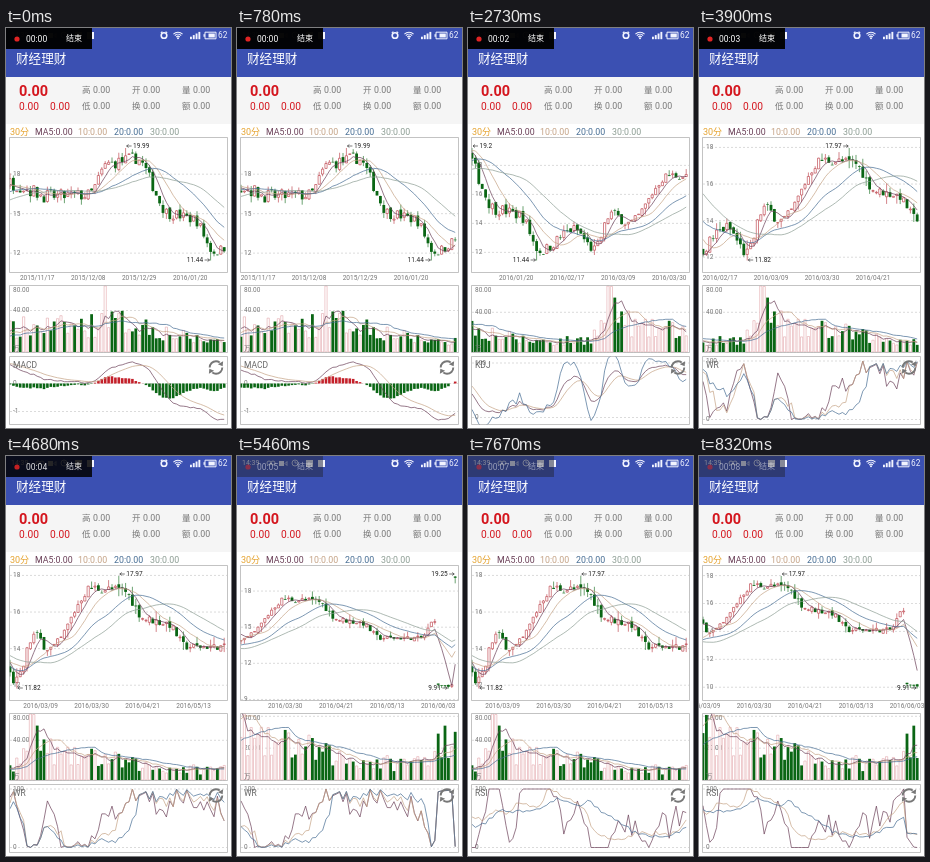
These frames come from a looping animation (225x400 px, 8450 ms). An HTML page with a canvas:

```html
<!DOCTYPE html>
<html lang="zh">
<head>
<meta charset="utf-8">
<style>
  html, body { margin: 0; width: 100%; height: 100%; overflow: hidden; background: #fff; }
  canvas { display: block; width: 225px; height: 400px; }
</style>
</head>
<body>
<canvas id="stage"></canvas>
<script>
const LOOP = 8450, PAD = 40, VISIBLE = 64, TOTAL = PAD + 149, PITCH = 3.4, LEFT = 4;
const RED = '#b8323c', PINK = '#e3a7ac', GREEN = '#0a6614', GRAY = '#777', HOT = '#d4161e';
const LINES = ['#6b4058', '#c4a285', '#456c93', '#8b9c92'];
const FONT = 'Roboto, "Noto Sans CJK SC", "Noto Sans CJK", sans-serif';
const DATES = ('2015/11/17 2015/12/08 2015/12/29 2016/01/20 2016/02/17 ' +
  '2016/03/09 2016/03/30 2016/04/21 2016/05/13 2016/06/03').split(' ');

const canvas = document.getElementById('stage');
const ctx = canvas.getContext('2d');
const dpr = window.devicePixelRatio || 1;
canvas.width = 225 * dpr;
canvas.height = 400 * dpr;

// Interpolates between [x, y] key points
const linear = f => f, eased = f => f * f * (3 - 2 * f);
function between(keys, x, ease) {
  const k = keys.findIndex(key => key[0] >= x);
  if (k < 0) return keys[keys.length - 1][1];
  if (k === 0) return keys[0][1];
  const [x0, y0] = keys[k - 1], [x1, y1] = keys[k];
  return y0 + ease((x - x0) / (x1 - x0)) * (y1 - y0);
}

let seed = 7;
const random = () => (seed = seed * 16807 % 2147483647) / 2147483647;
const hump = (n, center, width) => Math.exp(-(((n - center) / width) ** 2));

// Candle number and price at the turning points
const TURNS = [[-40, 13.5], [0, 17.3], [12, 16.3], [23, 16.4], [29, 18.8], [37, 19.2], [47, 15], [54, 14.6],
  [60, 12.1], [70, 13.6], [76, 12.2], [81, 14.7], [86, 14], [98, 17.3], [107, 17.2], [114, 15.6],
  [120, 15.4], [126, 14.1], [138, 14.1], [142, 15.6]];
const SCROLL = [[0, 0], [910, 3.5], [1300, 21], [2730, 40], [3900, 63], [5460, 85], [6400, 85], [7020, 65], [8320, 83]];

const open = [], close = [], high = [], low = [], volume = [];
for (let i = 0; i < TOTAL; i++) {
  const n = i - PAD, fell = n > 142, last = n === 148;
  const ceiling = n < 40 ? 19.9 : last ? 19.25 : n < 46 ? 19.1 : 17.9;
  const floor = n < 62 ? 11.5 : fell ? 9.95 : 11.9;
  const clamp = v => Math.max(floor, Math.min(ceiling, v));
  const trend = last ? 19.1 : fell ? 10.15 : between(TURNS, n, eased);
  close[i] = clamp(trend + (random() - 0.5) * (fell ? 0.2 : 1.1 - n / 180));
  const previous = i ? close[i - 1] : trend;
  const gapped = Math.abs(previous - close[i]) > 3;
  open[i] = clamp(gapped ? close[i] + 0.1 : previous + (random() - 0.5) * 0.25);
  high[i] = clamp(Math.max(open[i], close[i]) + random() ** 2 * 0.5);
  low[i] = clamp(Math.min(open[i], close[i]) - random() ** 2 * 0.5);
  const activity = 11 + 14 * hump(n, 8, 16) + 18 * hump(n, 34, 14) + 22 * hump(n, 82, 5)
    + 13 * hump(n, 96, 16) + 15 * hump(n, 146, 6);
  volume[i] = activity * (0.5 + 0.9 * random()) + 48 * hump(n, 28, 0.6) + 46 * hump(n, 80.4, 0.8);
}
[[34, 19.99], [40, 19.2], [106, 17.97], [148, 19.25]].forEach(([n, p]) => high[PAD + n] = p);
[[59, 11.44], [76, 11.82], [146, 9.91]].forEach(([n, p]) => low[PAD + n] = p);

const lastOf = (values, i, n) => values.slice(Math.max(0, i - n + 1), i + 1);
const sum = values => values.reduce((a, b) => a + b, 0);
const average = (values, n) => values.map((_, i) => { const w = lastOf(values, i, n); return sum(w) / w.length; });
const smooth = (values, k) => { let e = values[0]; return values.map(v => e += (v - e) * k); };
const moves = close.map((c, i) => i ? c - close[i - 1] : 0);
const position = n => close.map((c, i) => {
  const top = Math.max(...lastOf(high, i, n)), bottom = Math.min(...lastOf(low, i, n));
  return 100 * (c - bottom) / (top - bottom);
});
const rsi = n => moves.map((_, i) => {
  const w = lastOf(moves, i, n);
  return 100 * sum(w.map(v => Math.max(v, 0))) / (sum(w.map(Math.abs)) || 1);
});

const priceLines = [5, 10, 20, 30].map(n => average(close, n));
const volumeLines = [5, 10, 20].map(n => average(volume, n));
const fast = smooth(close, 2 / 13), slow = smooth(close, 2 / 27);
const dif = fast.map((v, i) => v - slow[i]), dea = smooth(dif, 0.2);
const k = smooth(position(9), 1 / 3), d = smooth(k, 1 / 3);
const indicators = {
  MACD: [dif, dea],
  KDJ: [k, d, k.map((v, i) => 3 * v - 2 * d[i])],
  WR: [6, 10, 20].map(n => position(n).map(v => 100 - v)),
  RSI: [4, 12, 24].map(rsi)
};

function text(s, x, y, size, color, align = 'left', weight = 400) {
  ctx.font = `${weight} ${size}px ${FONT}`;
  ctx.textAlign = align;
  ctx.textBaseline = 'middle';
  ctx.fillStyle = color;
  ctx.fillText(s, x, y);
}
function rect(x, y, w, h, color) {
  ctx.fillStyle = color;
  ctx.fillRect(x, y, w, h);
}
function path(points, color, width = 0.7) {
  ctx.strokeStyle = color;
  ctx.lineWidth = width;
  ctx.beginPath();
  points.forEach(p => ctx.lineTo(p[0], p[1]));
  ctx.stroke();
}
function arc(x, y, r, from, to, color, width) {
  ctx.strokeStyle = color;
  ctx.lineWidth = width;
  ctx.beginPath();
  ctx.arc(x, y, r, from, to);
  ctx.stroke();
}
function dot(x, y, r, color) {
  ctx.fillStyle = color;
  ctx.beginPath();
  ctx.arc(x, y, r, 0, 7);
  ctx.fill();
}
function box(x, y, w, h, color, width = 0.7) {
  ctx.strokeStyle = color;
  ctx.lineWidth = width;
  ctx.strokeRect(x, y, w, h);
}
function panel(top, bottom, content) {
  ctx.save();
  ctx.beginPath();
  ctx.rect(3, top, 219, bottom - top);
  ctx.clip();
  content();
  ctx.restore();
  box(3.5, top + 0.5, 218, bottom - top - 1, '#aaa');
}
function gridLine(y, label, labelY = y) {
  ctx.setLineDash([2, 2]);
  path([[4, y], [221, y]], '#ccc');
  ctx.setLineDash([]);
  text(label, 7, labelY, 6.5, GRAY);
}

const slots = Array.from({ length: VISIBLE }, (_, s) => s);
const slotX = s => LEFT + PITCH * s;
function plot(series, first, y) {
  series.forEach((values, n) => path(slots.map(s => [slotX(s), y(values[first + s])]), LINES[n]));
}
function bar(s, top, bottom, rising, outline) {
  const x = slotX(s), h = Math.max(bottom - top, 0.6);
  if (rising) {
    rect(x - 1.2, top, 2.4, h, '#fff');
    box(x - 1.1, top, 2.2, h, outline, 0.6);
  } else rect(x - 1.4, top, 2.8, h, GREEN);
}
function marker(s, y, value, toRight) {
  const x = slotX(s), dir = toRight ? 1 : -1;
  path([[x + dir, y], [x + 6 * dir, y]], '#222', 0.6);
  path([[x + 3 * dir, y - 1.5], [x + dir, y], [x + 3 * dir, y + 1.5]], '#222', 0.6);
  text(String(value), x + 7.5 * dir, y, 6.5, '#222', toRight ? 'left' : 'right');
}

function drawPrices(first) {
  const highs = high.slice(first, first + VISIBLE), lows = low.slice(first, first + VISIBLE);
  const hi = Math.max(...highs), lo = Math.min(...lows), span = hi - lo;
  const y = p => 232.5 - (p - lo) / span * 112.5;
  panel(109, 245, () => {
    const step = span > 8.2 ? 3 : span > 5 ? 2 : 1;
    for (let p = 18; y(p) < 244; p -= step) gridLine(y(p), p);
    slots.forEach(s => {
      const i = first + s, rising = close[i] >= open[i];
      path([[slotX(s), y(high[i])], [slotX(s), y(low[i])]], rising ? RED : GREEN, 0.6);
      bar(s, y(Math.max(open[i], close[i])), y(Math.min(open[i], close[i])), rising, RED);
    });
    plot(priceLines, first, y);
    const top = highs.indexOf(hi), bottom = lows.indexOf(lo);
    marker(top, y(hi) - 2, hi, slotX(top) < 130);
    marker(bottom, y(lo) - 0.5, lo, slotX(bottom) < 55);
  });
  DATES.forEach((date, n) => {
    const x = slotX(PAD + 8 + 15 * n - first);
    if (x >= 2 && x <= 222) text(date, x, 250.5, 6.5, GRAY, 'center');
  });
}

function drawVolumes(first) {
  const max = Math.max(...volume.slice(first, first + VISIBLE));
  const y = v => 324 - v / max * 66;
  panel(257, 325, () => {
    const step = max > 60 ? 40 : 20;
    for (const v of [step * 2, step]) gridLine(y(v), v.toFixed(2), Math.max(y(v), 262));
    slots.forEach(s => bar(s, y(volume[first + s]), 324, close[first + s] >= open[first + s], PINK));
    plot(volumeLines, first, y);
    text('万', 7, 321, 6.5, GRAY);
  });
}

function drawRefresh(x, y) {
  for (const turn of [0, Math.PI]) {
    ctx.save();
    ctx.translate(x, y);
    ctx.rotate(turn - 0.5);
    arc(0, 0, 6.3, 0.5, 2.7, GRAY, 1.9);
    ctx.fillStyle = GRAY;
    ctx.beginPath();
    ctx.moveTo(-9.2, 2);
    ctx.lineTo(-3.2, 2);
    ctx.lineTo(-6.5, -2);
    ctx.fill();
    ctx.restore();
  }
}

function drawIndicator(first, name) {
  const macd = name === 'MACD';
  const y = macd ? v => 355.5 - v * 28 : name === 'KDJ' ? v => 389.5 - v * 0.545 : v => 391.5 - v * 0.585;
  panel(328, 397, () => {
    (macd ? [0, -1] : [100, 0]).forEach(v => gridLine(y(v), v));
    if (macd) slots.forEach(s => {
      const v = dif[first + s] - dea[first + s];
      rect(slotX(s) - 1.3, 355.5, 2.6, -v * 28, v > 0 ? '#c4202a' : GREEN);
    });
    plot(indicators[name], first, y);
    text(name, 7, 337, 8.5, '#666');
    drawRefresh(210, 339.5);
  });
}

function drawStatusBar(t) {
  const white = '#f2f4ff';
  text('14:39', 5, 7, 7, white);
  [32, 36].forEach(x => arc(x, 7, 2, 0, 7, white, 0.8));
  rect(42, 5, 5, 5, white);
  path([[48, 7.5], [50, 5.5], [50, 9.5], [48, 7.5]], white);
  arc(58, 7, 3, 0, 7, white, 0.8);
  path([[58, 5], [58, 7], [60, 7]], white);
  [69, 81].forEach(x => rect(x, 4, 7, 7, white));

  const fade = Math.max(0, Math.min(1, (t - 4600) / 300));
  ctx.globalAlpha = 0.97 - 0.45 * fade;
  rect(0, 0, 86, 21, fade > 0.5 ? '#24283a' : '#000');
  ctx.globalAlpha = 1 - 0.5 * fade;
  dot(11, 11, 2.6, '#e02424');
  text('00:0' + Math.floor(Math.max(0, t - 60) / 1000), 20, 11, 8.5, '#fff');
  text('结束', 60, 11, 8, '#fff');
  ctx.globalAlpha = 1;

  arc(158, 7.5, 2.8, 0, 7, white, 1.6);
  [[154.8, 156.4, 1], [159.6, 161.2, -1]].forEach(([a, b, tilt]) => path([[a, 4.2 + tilt / 2], [b, 4.2 - tilt / 2]], white, 1.1));
  [2.5, 4.5, 6.5].forEach(r => arc(172, 10.8, r, -2.35, -0.8, white, 1.1));
  dot(172, 10.3, 1, white);
  [0, 1, 2, 3].forEach(n => rect(184 + n * 2.8, 8.7 - n * 1.6, 1.9, 2.5 + n * 1.6, white));
  box(199, 4.2, 11, 6.6, white, 1);
  rect(202.5, 5.5, 6.3, 4, white);
  rect(197.5, 6.2, 1.3, 2.6, white);
  text('62', 212, 7.5, 8.3, white);
}

function drawHeader(t) {
  rect(0, 0, 225, 49, '#3b50b2');
  drawStatusBar(t);
  text('财经理财', 10, 31.5, 12.6, '#fff', 'left', 500);
  rect(0, 49, 225, 47, '#f5f5f5');
  text('0.00', 13, 63.5, 14.5, HOT, 'left', 700);
  [13, 44].forEach(x => text('0.00', x, 78.5, 10.2, HOT));
  ['高开量', '低换额'].forEach((row, r) => [...row].forEach((label, c) => {
    text(label, 76 + 50 * c, 62 + 16 * r, 8.5, GRAY);
    text('0.00', 87 + 50 * c, 62 + 16 * r, 8.8, GRAY);
  }));
  text('30分', 4, 104, 9, '#e5a22d');
  ['MA5', '10', '20', '30'].forEach((name, n) => text(name + ':0.00', n ? 36 + 36 * n : 29, 104, 8.8, LINES[n]));
}

function frame(now) {
  const t = now % LOOP;
  const first = PAD + Math.round(between(SCROLL, t, linear));
  ctx.setTransform(dpr, 0, 0, dpr, 0, 0);
  ctx.lineJoin = 'round';
  rect(0, 0, 225, 400, '#fff');
  drawHeader(t);
  drawPrices(first);
  drawVolumes(first);
  drawIndicator(first, t < 2200 ? 'MACD' : t < 3200 ? 'KDJ' : t < 6000 ? 'WR' : 'RSI');
  requestAnimationFrame(frame);
}
requestAnimationFrame(frame);
</script>
</body>
</html>
```
